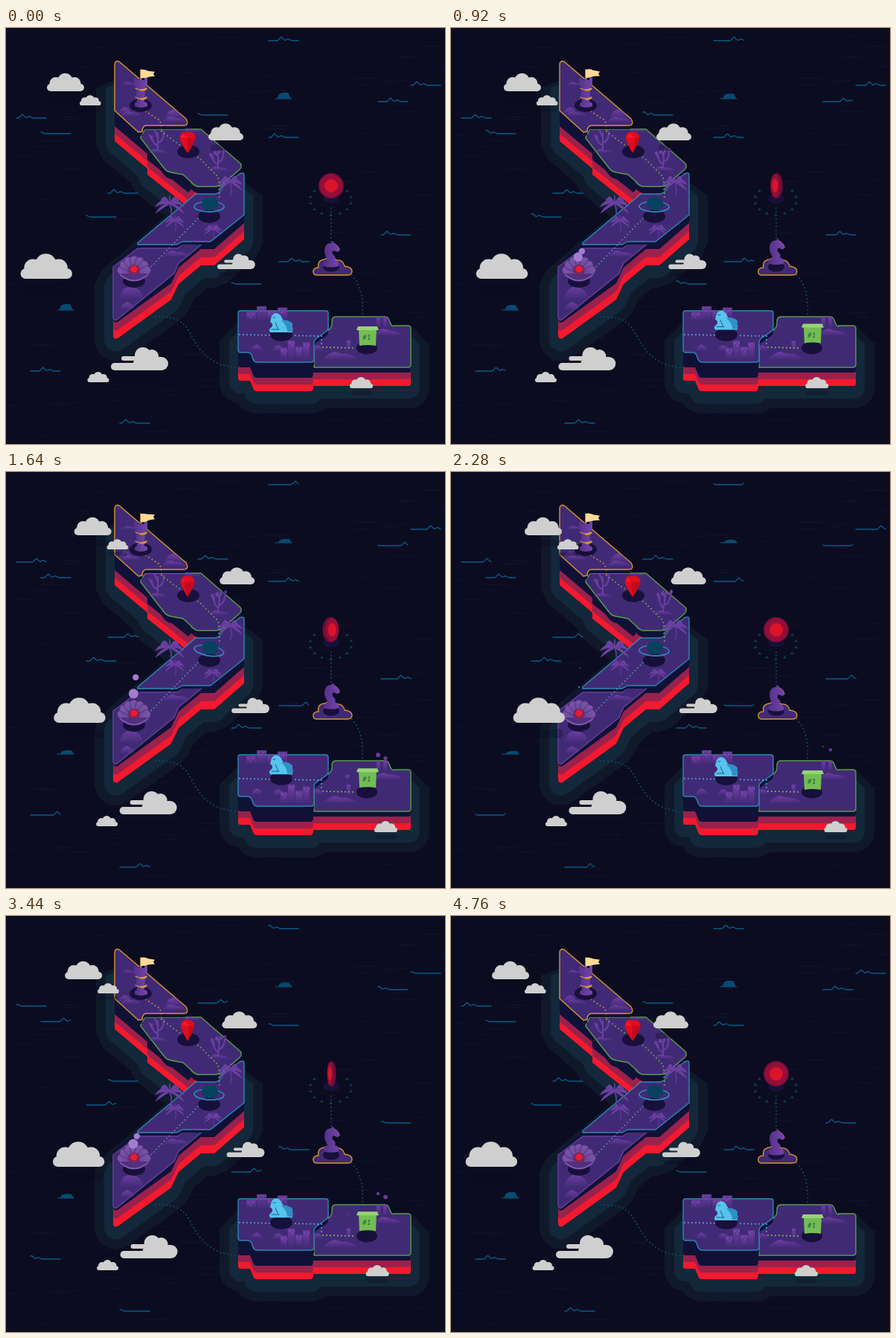
An HTML page for the animation above (4800 ms loop, 590 by 559 pixels).

```html
<!DOCTYPE html>
<html lang="en">
<head>
<meta charset="utf-8">
<title>Island map</title>
<style>
html, body { margin: 0; width: 100%; height: 100%; overflow: hidden; background: #0c0c20; }
svg { display: block; width: 590px; height: 559px; }
</style>
</head>
<body>
<svg id="stage" viewBox="0 0 590 559" xmlns="http://www.w3.org/2000/svg">
<defs>
  <linearGradient id="rise" x1="0" y1="0" x2="0" y2="1">
    <stop offset="0" stop-color="#6f3fa5"/><stop offset="1" stop-color="#6f3fa5" stop-opacity=".08"/>
  </linearGradient>
  <linearGradient id="petal" x1="0" y1="0" x2="0" y2="1">
    <stop offset="0" stop-color="#7d57a8"/><stop offset="1" stop-color="#5b3a8f"/>
  </linearGradient>
  <linearGradient id="body" x1="0" y1="0" x2="1" y2="0">
    <stop offset="0" stop-color="#55308a"/><stop offset="1" stop-color="#7446aa"/>
  </linearGradient>
</defs>
</svg>
<script>
const LOOP = 4800, STEP = 40, TAU = Math.PI * 2;
const stage = document.getElementById('stage');
const NS = stage.namespaceURI;

function el(tag, attrs = {}, parent = stage) {
  const node = document.createElementNS(NS, tag);
  for (const k in attrs) node.setAttribute(k, attrs[k]);
  return parent.appendChild(node);
}
const group = (x = 0, y = 0, scale = 1, parent) => el('g', { transform: `translate(${x} ${y}) scale(${scale})` }, parent);
const path = (d, fill, parent, more = {}) => el('path', { d, fill, ...more }, parent);
const line = (d, stroke, w, parent, more = {}) =>
  path(d, 'none', parent, { stroke, 'stroke-width': w, 'stroke-linecap': 'round', 'stroke-linejoin': 'round', ...more });
const oval = (cx, cy, rx, ry, fill, parent, more = {}) => el('ellipse', { cx, cy, rx, ry, fill, ...more }, parent);
const box = (x, y, width, height, fill, parent, rx = 0) => el('rect', { x, y, width, height, rx, fill }, parent);
const dots = (d, color) => line(d, color, 2, stage, { 'stroke-dasharray': '0 5' });
const move = (node, x, y, extra = '') => node.setAttribute('transform', `translate(${x} ${y}) ${extra}`);
const mod = (a, n) => ((a % n) + n) % n;
const swing = u => (1 - Math.cos(Math.PI * Math.min(1, Math.max(0, u)))) / 2;
function range(n, fn) {
  return Array.from({ length: n }, (_, i) => fn(i, i / (n - 1)));
}

// Sea
let seed = 7;
const rand = () => (seed = (seed * 16807) % 2147483647) / 2147483647;
range(130, () => box(rand() * 580, Math.round(10 + rand() * 540), 8 + rand() * 28, 1, '#11132b'));

// Cliff outlines at their lowest edge; the shoals are wide strokes around them.
const cliffs = [
  ['M146 75V152L190 189V197L245 241 262 222 215 150Z', 10],
  ['M144 340V414Q145 419 150 417L222 365 232 344 262 319H280L320 284V220L262 240Z', 11],
  ['M312 415V471Q312 474 315 474H328L333 486Q334 488 337 488H410Q413 488 413 481H541Q544 481 544 478V420Z', 9],
];
for (const [color, w] of [['#10192a', 50], ['#13283a', 24]])
  for (const [d] of cliffs)
    path(d, color, stage, { stroke: color, 'stroke-width': w, 'stroke-linejoin': 'bevel', transform: 'translate(0 5)' });

// Waves grouped by the place of their crest at the start
const SPAN = 55, WAVE = '#075c86';
const waves = Object.entries({
  17: [[353, 17], [500, 99], [367, 314], [33, 461]],
  8: [[14, 121], [353, 147], [544, 77], [137, 222], [504, 278], [153, 531]],
  46: [[47, 142], [258, 117], [108, 254], [303, 344]],
}).flatMap(([peak, spots]) => spots.map(([x, y]) => ({ x, y, peak: +peak, node: line('', WAVE, 1.3) })));
function crest(x) {
  const d = mod(x + SPAN / 2, SPAN) - SPAN / 2;
  const bump = (c, h) => Math.max(0, 1 - Math.abs(d - c) / 5) * h;
  return bump(0, 5) + bump(9, 2.4);
}
const fins = [[373, 95], [80, 379]].map(([x, y]) => {
  const g = group(x, y);
  line('M-11 0H11', WAVE, 1.2, g);
  return path('M-9 0L-6 -6 -2 -8 6 -8 10 0Z', '#074b70', g);
});

for (const d of ['M201 388C240 387 243 403 253 420S278 454 309 456', 'M479 384C481 362 475 341 464 332', 'M437 287V239'])
  dots(d, '#0b4c70');

// Islands
const TOP = '#412a75', NAVY = '#0f1236';
for (const [d, h] of cliffs)
  ['#f4192e', '#9a214c', NAVY].forEach((c, i) => path(d, c, stage, { transform: `translate(0 ${-h * i})` }));

function tile(edge, drop, d) {
  if (drop) path(d, NAVY, stage, { transform: `translate(0 ${drop})` });
  path(d, TOP, stage, { stroke: edge, 'stroke-width': 1.4, 'stroke-linejoin': 'round' });
}
const GOLD = '#d5942f', GREEN = '#599b4c', BLUE = '#2c86b6';
tile(GREEN, 9, 'M181 148Q181 144 184 141L187 136H262L315 182Q318 186 314 190L290 211Q286 213 280 213H258Q252 212 248 206L238 197 222 194Q216 193 213 189Z');
tile(GOLD, 5, 'M146 50Q146 43 152 45L242 122Q247 131 238 131H188Q183 132 183 139L178 140 146 111Z');
tile('#65409b', 0, 'M144 321L177 296H231L237 290H264L232 316 226 330 149 392Q144 394 144 388Z');
tile(BLUE, 4, 'M178 288L255 223H280Q287 223 291 214L299 207 314 196Q320 193 320 198V251L275 287H237L230 291H181Q174 292 178 288Z');
tile(GREEN, 0, 'M414 421L433 406Q439 402 438 395 438 388 443 388H510Q514 388 516 395T522 400H540Q544 400 544 404V452Q544 456 540 456H414Z');
tile(BLUE, 6, 'M312 383Q312 380 315 380H430Q433 380 433 383V403Q433 406 430 408L417 417Q414 419 414 423V445Q414 449 410 449H337Q333 449 331 442 329 436 325 436H315Q312 436 312 432Z');
tile(GOLD, 0, 'M417 332Q412 331 413 326 414 322 420 322 418 312 428 311 437 306 444 312 453 311 455 320 465 321 465 327 465 332 459 332Z');

// Scenery
const mound = (x, y, w) => path(`M${x - w} ${y}Q${x - w * .4} ${y - w * .5} ${x - w * .2} ${y - w * .4}T${x + w * .3} ${y - w * .3}T${x + w} ${y}Z`, 'url(#rise)');
const rock = (x, y, w) => path(`M${x - w} ${y}L${x - w * .6} ${y - w * .7} ${x} ${y - w} ${x + w * .7} ${y - w * .6} ${x + w} ${y}Z`, 'url(#rise)');
function palm(x, y, s) {
  const g = group(x, y, s);
  line('M0 0Q4 10 1 21', '#61379a', 2, g);
  range(7, (i, u) => {
    const a = (-200 + 220 * u) * TAU / 360, cx = Math.cos(a), cy = Math.sin(a);
    const tip = `${20 * cx} ${14 * cy + 8}`;
    path(`M0 0Q${12 * cx} ${14 * cy - 5} ${tip}Q${10 * cx} ${11 * cy + 2} 0 0Z`, '#6c40a3', g, { stroke: '#6c40a3' });
  });
}
function coral(x, y, s) {
  const g = group(x, y, s);
  line('M0 0V-22M0 -5Q-8 -8 -8 -18M0 -9Q8 -10 8 -24M-8 -13L-11 -19M0 -16L-4 -25', '#68409f', 2.2, g);
  return g;
}
function skyline(x, y, n, w, tall) {
  range(n, i => {
    const h = tall * (.45 + .5 * Math.abs(Math.sin(i * 1.3 + .2))), left = x + i * w;
    box(left, y - h, w - 1, h, 'url(#rise)');
    range(3, k => box(left + 2 + k * 3, y - h + 3 + k % 2 * 3, 1, 1, '#a070c8'));
  });
}
for (const [x, y, w] of [[166, 77, 11], [168, 118, 15], [226, 126, 17], [250, 140, 12], [204, 168, 13], [286, 192, 15], [229, 307, 19], [449, 445, 24], [513, 413, 21]])
  mound(x, y, w);
for (const [x, y, w] of [[160, 115, 9], [225, 121, 12], [168, 363, 17], [163, 378, 10], [337, 433, 8], [366, 434, 8], [419, 433, 7]])
  rock(x, y, w);
coral(204, 163, 1);
const weed = coral(285, 188, .9);
range(4, (i, u) => oval(-11 + 19 * u, -20 - 6 * u, 2.3, 2.3, '#6c43a0', weed));
palm(220, 236, 1); palm(301, 207, .85); palm(227, 259, .65); palm(278, 270, .6);
skyline(323, 392, 4, 14, 19);
skyline(369, 444, 4, 10, 25);
for (const x of [458, 498, 507]) box(x, x < 490 ? 420 : 388, 5, 14, 'url(#rise)');

dots('M188 112L205 123Q209 127 209 138', '#c98a38');
dots('M209 139L226 152 260 175 284 199Q287 203 287 232', '#6da34c');
dots('M258 256L190 326', '#5b87b3');
dots('M314 412L424 414V428', '#46aee0');
dots('M426 429L470 430', '#82c25a');

const shade = (x, y, rx = 15) => oval(x, y, rx, rx * .6, '#17103a');
shade(181, 104); shade(245, 166); shade(273, 253); shade(172, 340);
shade(370, 412); shade(485, 430, 14); shade(437, 321, 11); shade(437, 229, 11);

// Tower
path('M173 105V101L176 99 175 80 172 76V67H176V70H179V67H183V70H186V67H190V76L187 80 186 99 190 101V105Q181 109 173 105Z', 'url(#body)');
for (const y of [81, 93]) line(`M174 ${y}Q181 ${y + 4} 189 ${y}Q189 ${y + 3} 181 ${y + 3}`, '#d99a3c', 1.4);
line('M181 56V68', '#e2a64c', 1.4);
const flag = path('', '#ffd996');

// Shell
const clam = group(172, 329);
range(7, (i, u) => path('M0 5L-6 -19Q0 -27 6 -19Z', 'url(#petal)', clam,
  { transform: `rotate(${-78 + 156 * u})`, stroke: '#4b2d7d', 'stroke-width': .8 }));
oval(0, 5, 15, 5, '#51317f', clam);
oval(0, -4, 8, 7, '#74285f', clam);
oval(0, -5, 4.5, 4.5, '#f2182c', clam);
line('M-18 3Q0 18 18 3', '#8158ae', 2, clam);
const bubbles = range(2, () => oval(0, 0, 1, 1, '#a47cd0'));

const gem = { body: path('', '#e20c1d'), side: path('', '#c00b1d'), shine: path('', '#ee1c2c') };

// Planet
const planet = group();
oval(0, 1, 20, 7, 'none', planet, { stroke: BLUE, 'stroke-width': 1.5 });
oval(1, -3, 11, 9, '#06425f', planet);
line('M-20 1C-20 5 -11 8 0 8S20 5 20 1', BLUE, 1.5, planet);

// Floating pieces
const beast = group();
path('M356 391Q357 384 363 383 369 384 371 390 373 395 379 394 387 397 385 409H355Q352 405 357 402 360 398 355 395Z', '#56c4ec', beast);
path('M370 393Q379 391 385 397V408H378Q378 400 370 393Z', '#318fc4', beast);
line('M359 389H362M357 405H367M362 396L366 405', '#1b5f90', 1, beast);

const crate = group();
path('M474 404H498L497 427Q486 425 475 427Z', '#73bd55', crate);
path('M473 401H499L501 406H471Z', '#97d476', crate);
el('text', { x: 479, y: 419, 'font-family': 'Lato, sans-serif', 'font-size': 10, 'font-style': 'italic', fill: '#245a36' }, crate).textContent = '#1';

const knight = group();
path('M427 320V315Q432 313 432 311 426 302 429 294 431 289 437 289L439 286 441 289Q447 292 449 298L446 301 440 299Q437 302 440 305 444 308 442 312 447 313 447 316V320Q437 323 427 320Z', 'url(#body)', knight);
line('M441 290Q447 293 448 298', '#a84b95', 1, knight);

// Coin
range(11, (i, u) => {
  const a = (-38 + 256 * u) * TAU / 360, x = 436.5 + 28 * Math.cos(a), y = 231 + 20 * Math.sin(a);
  path(`M${x - 2.5} ${y + 1.5}L${x} ${y - 2} ${x + 2.5} ${y + 1.5}Z`, '#0c3c59');
});
const coin = [[17, '#6d0e36'], [15.5, '#930f3a'], [9, '#dd132a']].map(([r, c]) => ({ r, node: oval(437, 212, r, r, c) }));

const puffs = [459, 500, 510].flatMap((x, k) => range(2, i =>
  ({ x, y: k ? 394 : 427, born: 600 + 250 * k + 1400 * i, node: oval(x, 0, 0, 0, '#663b98') })));

// Clouds; delay holds back both the start and the turning point
const WHITE = '#cfcfcf';
function puffy(g) {
  box(0, -10, 50, 10, WHITE, g, 5);
  range(3, i => oval(12 + 12.5 * i, i === 1 ? -14 : -10.5, 8.5 + i % 2 * 1.8, 8.5 + i % 2 * 1.8, WHITE, g));
}
function streaky(g) {
  oval(43, -20, 11, 11, WHITE, g);
  oval(55, -19, 9, 9, WHITE, g);
  box(30, -18, 47, 18, WHITE, g, 9);
  box(0, -10, 60, 10, WHITE, g, 5);
  box(14, -19, 32, 6, WHITE, g, 3);
}
function cloud(draw, x, y, scale, run, delay = 0) {
  const g = group(x, y), art = group(0, 0, scale, g);
  el('rect', { x: 3, y: 6, width: draw === puffy ? 45 : 70, height: 9, rx: 3, fill: '#0b0820', opacity: .3 }, art);
  draw(art);
  return { g, x, y, run, start: delay, turn: 2240 + 1.5 * delay };
}
const clouds = [
  cloud(puffy, 55, 85, 1, 44),
  cloud(puffy, 99, 104, .57, 44),
  cloud(puffy, 19.5, 337, 1.39, 66, 200),
  cloud(puffy, 272, 151, .94, 25.5, 300),
  cloud(streaky, 284, 324, .66, 23),
  cloud(streaky, 141, 460, 1, 18.3, 250),
  cloud(puffy, 109.5, 476, .58, 18.3, 250),
  cloud(puffy, 462, 484, .62, 39.5),
];

function setOval(node, cx, cy, r) {
  node.setAttribute('cx', cx);
  node.setAttribute('cy', cy);
  node.setAttribute('rx', r);
  node.setAttribute('ry', r);
}

function render(t) {
  const turn = TAU * t / LOOP, half = t % (LOOP / 2);
  const c = Math.cos(turn);

  for (const { g, x, y, run, start, turn: back } of clouds) {
    const u = t < back ? swing((t - start) / (back - start)) : 1 - swing((t - back) / (LOOP - back));
    move(g, x + run * u, y);
  }
  for (const w of waves) {
    const points = range(41, i => `${w.x + i} ${(w.y - crest(i - w.peak - SPAN * t / LOOP)).toFixed(2)}`);
    w.node.setAttribute('d', 'M' + points.join('L'));
  }
  for (const f of fins) move(f, 1 - c, 0, `scale(1 ${.75 + .25 * c})`);

  // The coin shows its rim on the side turned away from the viewer.
  const thin = 1 - Math.abs(c), side = -Math.sin(turn) * Math.sign(c) * 1.6;
  coin.forEach(({ r, node }, i) => {
    node.setAttribute('cx', 437 + (i ? side : -side * .5));
    node.setAttribute('rx', r * (1 - thin) + (i ? .8 : 2.6) * Math.sqrt(thin));
  });

  // The gem is flat-topped face on and rounder when turned.
  const k = c * c, w = 9 + 1.6 * k, x = 244, cap = 3 + 3 * k, mid = x + 5 * Math.sin(turn * 2);
  gem.body.setAttribute('d', `M${x - cap} 140Q${x} ${138.5 + k} ${x + cap} 140Q${x + w} ${140.5 + 2 * k} ${x + w} 148Q${x + w - 1} 154 ${x} 168Q${x - w + 1} 154 ${x - w} 148Q${x - w} ${140.5 + 2 * k} ${x - cap} 140Z`);
  gem.side.setAttribute('d', `M${mid} 148L${x + w} 148Q${x + w - 1} 154 ${x} 168Z`);
  gem.shine.setAttribute('d', `M${x - cap} 141L${mid} 148 ${x - w + 1} 147Z`);

  move(planet, 273, 239, `rotate(${3 + 6 * Math.sin(turn * 2 + 3.6)})`);
  move(weed, 285, 188, `rotate(${4 - 4 * c}) scale(.9 ${1 - .1 * c})`);
  for (const g of [beast, crate, knight]) move(g, 0, -2 * (1 - Math.cos(turn * 2)));

  const f = n => .8 * Math.sin(turn * 4 + n);
  flag.setAttribute('d', `M181 56Q186 ${55 + f(0)} 191 ${57 + f(1)}L200 ${58 + f(2)} 198 ${61 + f(2)} 200 ${64 + f(2)} 192 ${65 + f(1)}Q187 ${68 + f(0)} 181 67Z`);

  const grow = born => half < born ? 0 : Math.min(1, (half - born) / 550, (2380 - half) / 680);
  setOval(bubbles[0], 174.5 + 1.5 * Math.sin(half / 500), 330.5 - half * .0333 + Math.max(0, half - 1640) * .013, 4.2 * grow(350));
  setOval(bubbles[1], 170 + half / 1200, 320.5 - half * .0138, 6.5 * grow(400));

  for (const p of puffs) {
    const u = Math.min(1, mod(t - p.born, LOOP) / 1600);
    setOval(p.node, p.x, p.y - 28 * u, 3 * Math.sin(Math.PI * u));
  }
}

const begin = performance.now();
function tick() {
  const t = (performance.now() - begin) % LOOP;
  render(Math.floor(t / STEP) * STEP);
  requestAnimationFrame(tick);
}
tick();
</script>
</body>
</html>
```
